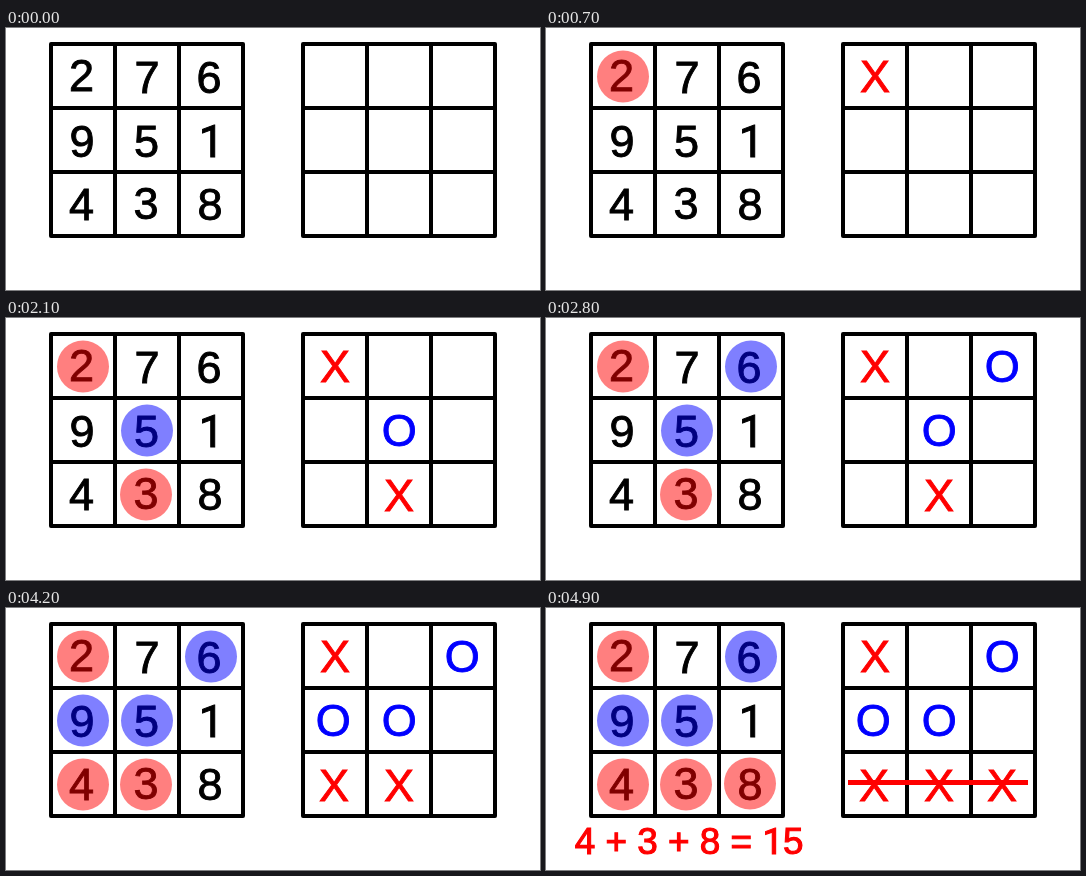
Animation of 534x262 px, one loop 9800 ms. Source, as an HTML page:

```html
<!DOCTYPE html>
<html lang="en">
<head>
<meta charset="utf-8">
<title>Magic square tic-tac-toe</title>
<style>
  @property --turn { syntax: "<number>"; inherits: true; initial-value: 0; }
  html, body { margin: 0; width: 100%; height: 100%; overflow: hidden; background: #fff; }
  svg {
    display: block; width: 100vw; height: 100vh;
    font-family: "Liberation Sans", Arial, sans-serif; font-size: 45px;
    animation: play 9.8s steps(14) infinite;
  }
  /* 14 turns of 700 ms; the last seven hold the result */
  @keyframes play { from { --turn: 0; } to { --turn: 14; } }
  .move { opacity: clamp(0, var(--turn) - var(--at) + 1, 1); }
  .x { fill: #f00; --ink: #f00; }
  .o { fill: #00f; --ink: #00f; }
  circle { fill-opacity: .5; }
  text { text-anchor: middle; stroke: var(--ink, #000); stroke-width: .9; }
  /* a numeral one without a foot */
  .one { font-family: Roboto, sans-serif; }
  .grid { fill: none; stroke: #000; stroke-width: 4; stroke-linejoin: round; }
  .strike { stroke: #f00; stroke-width: 5; }
  .sum { font-size: 36.9px; text-anchor: start; stroke-width: 1.1; }
</style>
</head>
<body>
<svg viewBox="0 0 534 262">
  <defs>
    <path id="grid" class="grid" d="M0 0h192v192h-192zM64 0v192M128 0v192M0 64h192M0 128h192"/>
  </defs>
  <use href="#grid" x="45" y="16"/>
  <use href="#grid" x="297" y="16"/>

  <text x="75.5" y="63">2</text>
  <text x="141" y="65">7</text>
  <text x="203" y="65">6</text>
  <text x="76" y="129">9</text>
  <text x="140.5" y="129">5</text>
  <text x="205.5" y="128.5" class="one">1</text>
  <text x="75.5" y="192">4</text>
  <text x="140" y="191">3</text>
  <text x="204" y="192">8</text>

  <g class="move x" style="--at:1">
    <circle cx="77" cy="48.5" r="26"/><text x="329" y="63.5">X</text>
  </g>
  <g class="move o" style="--at:2">
    <circle cx="141" cy="112.5" r="26"/><text x="393.3" y="127.8">O</text>
  </g>
  <g class="move x" style="--at:3">
    <circle cx="140" cy="176.5" r="26"/><text x="393" y="192.5">X</text>
  </g>
  <g class="move o" style="--at:4">
    <circle cx="205" cy="48.5" r="26"/><text x="456.3" y="63.8">O</text>
  </g>
  <g class="move x" style="--at:5">
    <circle cx="77" cy="176.5" r="26"/><text x="328" y="192.5">X</text>
  </g>
  <g class="move o" style="--at:6">
    <circle cx="77" cy="112.5" r="26"/><text x="327.3" y="127.8">O</text>
  </g>
  <g class="move x" style="--at:7">
    <circle cx="204" cy="175.5" r="26"/><text x="456" y="192.5">X</text>
    <path class="strike" d="M302 174.5H482"/>
    <text class="sum" x="28.7" y="245.8">4 + 3 + 8 = <tspan class="one">1</tspan>5</text>
  </g>
</svg>
</body>
</html>
```
